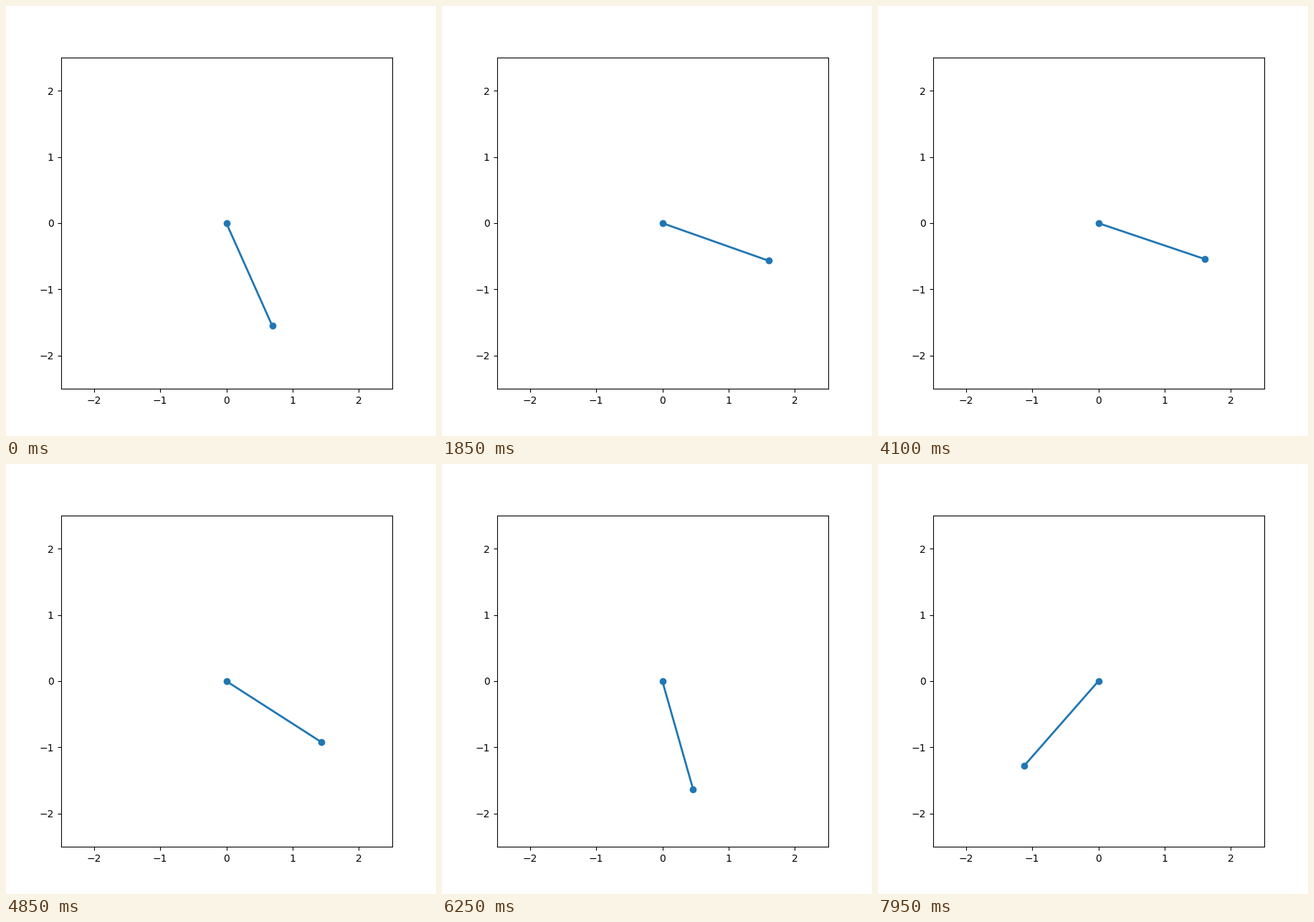
These frames come from a looping animation (600x600 px, 8000 ms). A matplotlib script:

```python
import numpy as np
import matplotlib.pyplot as plt
from matplotlib.animation import FuncAnimation

LENGTH = 1.7
AMPLITUDE = np.radians(79.15)
OMEGA = 0.4813      # small-angle frequency, rad per second
PEAK = 3.0035       # time of the rightmost turning point, s
STEP_MS = 50
FRAMES = 160


def swing(duration, dt=0.005):
    """Pendulum angle after release from rest at the amplitude (RK4)."""
    def rate(state):
        return np.array([state[1], -OMEGA ** 2 * np.sin(state[0])])

    times = np.arange(0, duration + dt, dt)
    state = np.array([AMPLITUDE, 0.0])
    angles = []
    for _ in times:
        angles.append(state[0])
        k1 = rate(state)
        k2 = rate(state + dt / 2 * k1)
        k3 = rate(state + dt / 2 * k2)
        k4 = rate(state + dt * k3)
        state = state + dt / 6 * (k1 + 2 * k2 + 2 * k3 + k4)
    return times, np.array(angles)


# The swing is symmetric in time about its turning point.
frame_times = np.arange(FRAMES) * STEP_MS / 1000
theta = np.interp(np.abs(frame_times - PEAK), *swing(5.5))

fig, ax = plt.subplots(figsize=(6, 6), dpi=100)
ax.set_aspect("equal")
ax.set_xlim(-2.5, 2.5)
ax.set_ylim(-2.5, 2.5)
ax.set_xticks(range(-2, 3))
ax.set_yticks(range(-2, 3))
rod, = ax.plot([], [], "o-", lw=2, color="C0")


def update(i):
    rod.set_data([0, LENGTH * np.sin(theta[i])],
                 [0, -LENGTH * np.cos(theta[i])])
    return rod,


anim = FuncAnimation(fig, update, frames=FRAMES, interval=STEP_MS,
                     repeat=True, repeat_delay=0)
plt.show()
```
